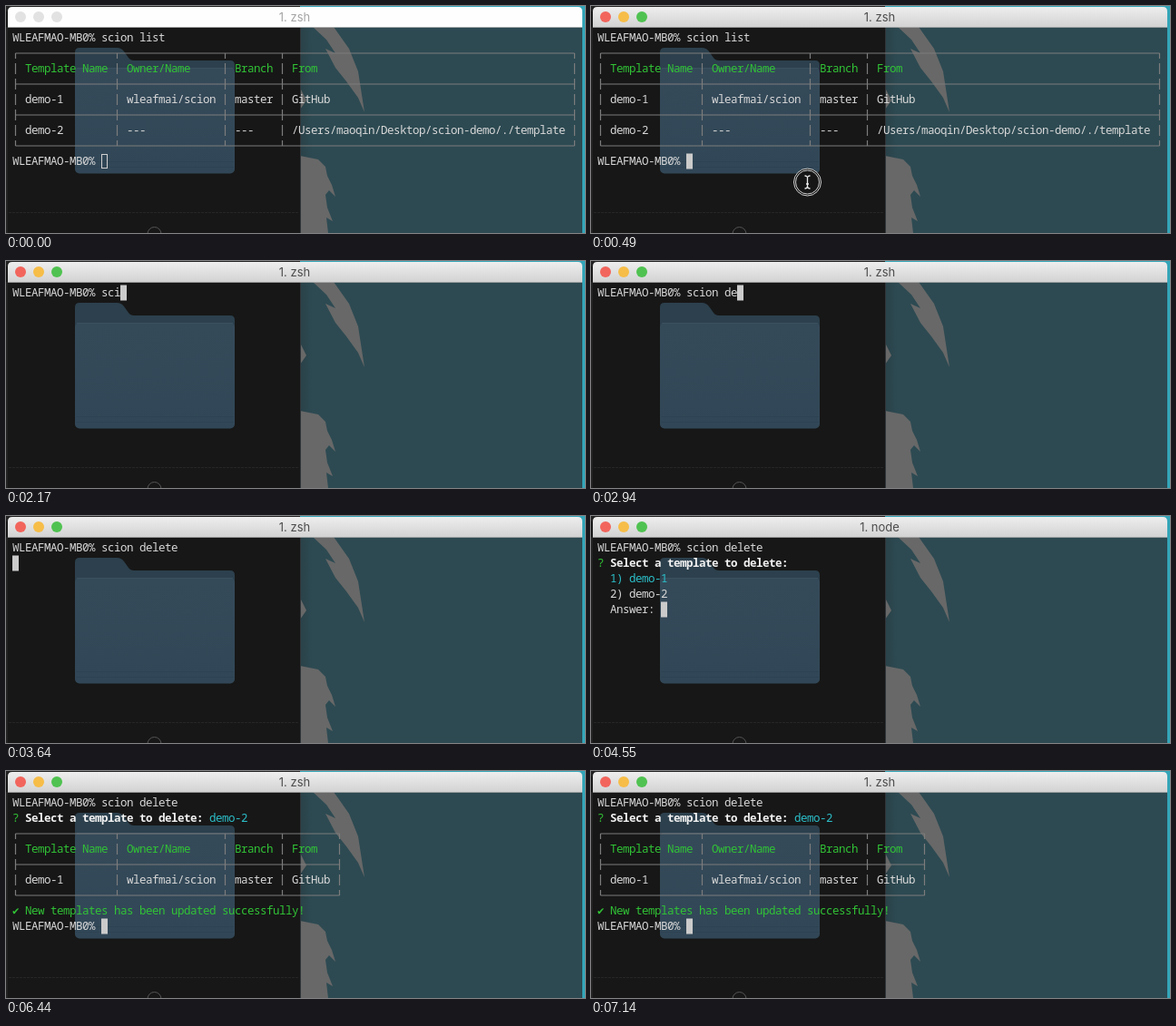
Animation of 638x250 px, one loop 7490 ms. Source, as an HTML page:

```html
<!DOCTYPE html>
<html lang="en">
<head>
<meta charset="utf-8">
<title>Terminal: deleting a template</title>
<style>
  html, body { margin: 0; width: 100%; height: 100%; overflow: hidden; background: #171717; }
  svg { display: block; width: 638px; height: 250px; }
  .mono { font: 12.5px "Noto Sans Mono", "DejaVu Sans Mono", monospace; letter-spacing: -.5px; fill: #d8d8d8; }
  .title { font: 13px Inter, Roboto, "Liberation Sans", sans-serif; text-anchor: middle; }
  .green { fill: #31c336; }
  .cyan { fill: #2cbfc9; }
  .bold { font-weight: 700; fill: #f2f2f2; }
  .rule { stroke: #7c7c7c; stroke-width: 1.2; fill: none; }
</style>
</head>
<body>
<svg viewBox="0 0 638 250" xmlns="http://www.w3.org/2000/svg">
  <defs>
    <linearGradient id="bar" x2="0" y2="1">
      <stop offset="0" stop-color="#eeeeee"/><stop offset="1" stop-color="#d2d2d2"/>
    </linearGradient>
    <linearGradient id="front" x2="0" y2="1">
      <stop offset="0" stop-color="#354a59"/><stop offset="1" stop-color="#314757"/>
    </linearGradient>
    <linearGradient id="edge">
      <stop offset="0" stop-color="#2a4148"/><stop offset="1" stop-color="#2d4a52"/>
    </linearGradient>
    <path id="beam" d="M-3 -7Q0 -7 0 -4.500V4.500Q0 7 -3 7M3 -7Q0 -7 0 -4.500V4.500Q0 7 3 7M-1.500 2H1.500"/>
  </defs>

  <!-- desktop seen through the window -->
  <rect width="638" height="250" fill="#171717"/>
  <rect x="324" width="314" height="250" fill="#2d4a52"/>
  <rect x="324" width="14" height="250" fill="url(#edge)"/>
  <g fill="#686868">
    <path d="M338 23H361L378 47L388 72L395 117L388 101L375 83L363 68L352 47L363 52L353 37Z"/>
    <path d="M324 90L331 104L324 114Z"/>
    <path d="M324 165L344 169L352 177L354 187L359 197L363 210L356 203L352 208L354 222L360 237L353 233L355 250H324Z"/>
  </g>
  <path d="M324.500 23V250" stroke="#30363a"/>
  <path d="M3 227.500H323" stroke="#262626" stroke-dasharray="3 1"/>
  <circle cx="163.500" cy="251" r="7.500" fill="none" stroke="#555"/>
  <path d="M76 180V51Q76 46 81 46H122Q127 46 130 50L135 57Q137 60 141 60H247Q252 60 252 65V180Z" fill="#2c404d"/>
  <rect x="76" y="68" width="176" height="116.500" rx="5" fill="url(#front)"/>
  <path d="M78 68.500H250" stroke="#3a5060"/>
  <path d="M77 171.500H251M77 177.500H251" stroke="#2d4252"/>
  <path d="M1 23V250" stroke="#222" stroke-width="2"/>
  <path d="M636.500 0V250" stroke="#34a5b8" stroke-width="3"/>

  <!-- title bar -->
  <rect width="324" height="6" fill="#222"/>
  <rect x="324" width="314" height="6" fill="#34a5b8"/>
  <path id="head" d="M2 23.500V6Q2 1 7 1H630Q635 1 635 6V23.500Z"/>
  <path d="M2 23.500H635" stroke="#a9a9a9" stroke-width=".6"/>
  <g id="lights">
    <circle cx="16" cy="12" r="6"/><circle cx="36" cy="12" r="6"/><circle cx="56" cy="12" r="6"/>
  </g>
  <text id="title" class="title" x="318" y="17"></text>

  <g id="screen" class="mono"></g>
  <rect id="caret"/>
  <text id="under" class="mono"></text>

  <g id="mouse" fill="none">
    <g id="ring">
      <circle r="15" fill="#161616" stroke="#cfcfcf"/>
      <circle r="13" stroke="#cfcfcf"/>
    </g>
    <use href="#beam" stroke="#161616" stroke-width="3"/>
    <use href="#beam" stroke="#ececec" stroke-width="1.300"/>
  </g>
</svg>

<script>
const LOOP = 7490, STEP = 70, CELL = 7, LINE = 17;
const FOCUS = 420, CLEAR = 1120, HIDE = 1610, ENTER = 3640;
const ASK = 4480, PICK = 5530, CONFIRM = 5670, DONE = 5740;
const PROMPT = "WLEAFMAO-MB0%";
const COMMAND = "scion delete";
const KEYS = [1610, 1890, 2170, 2240, 2380, 2520, 2660, 2940, 3080, 3220, 3360, 3430];

const $ = id => document.getElementById(id);
const colX = col => 7 + col * CELL;
const rowY = row => 35 + row * LINE;
const timed = [];

function add(tag, attrs, parent = $("screen")) {
  const el = document.createElementNS("http://www.w3.org/2000/svg", tag);
  for (const key in attrs) el.setAttribute(key, attrs[key]);
  return parent.appendChild(el);
}

function scene(from, to) {
  const el = add("g", {});
  timed.push({ el, from, to });
  return el;
}

function write(parent, row, col, text, style = "") {
  const el = add("text", { x: colX(col), y: rowY(row) + 4, class: style }, parent);
  el.textContent = text;
  return el;
}

// Box-drawing table: one rule above each record and one below the last.
function table(parent, top, bars, records) {
  const xs = bars.map(col => colX(col) + 3.5);
  const last = records.length * 2;
  let d = "";
  for (let i = 0; i <= last; i++) {
    const y = rowY(top + i);
    if (i % 2 === 0) d += `M${xs[0]} ${y}H${xs[xs.length - 1]}`;
    const y1 = i === 0 ? y : y - 6, y2 = i === last ? y : y + 6;
    for (const x of xs) d += `M${x} ${y1}V${y2}`;
  }
  add("path", { d, class: "rule" }, parent);
  records.forEach((cells, r) => cells.forEach((text, c) =>
    write(parent, top + 1 + r * 2, bars[c] + 2, text, r ? "" : "green")));
}

const header = ["Template Name", "Owner/Name", "Branch", "From"];
const first = ["demo-1", "wleafmai/scion", "master", "GitHub"];
const second = ["demo-2", "---", "---", "/Users/maoqin/Desktop/scion-demo/./template"];

write($("screen"), 0, 0, PROMPT);
const typed = write($("screen"), 0, 14, "");

const list = scene(0, CLEAR);
table(list, 1, [0, 16, 33, 42, 88], [header, first, second]);
write(list, 8, 0, PROMPT);

const question = scene(ASK, LOOP);
write(question, 1, 0, "?", "green");
write(question, 1, 2, "Select a template to delete:", "bold");

const choices = scene(ASK, CONFIRM);
const one = write(choices, 2, 2, "1) demo-1");
const two = write(choices, 3, 2, "2) demo-2");
write(choices, 4, 2, "Answer:");

write(scene(CONFIRM, LOOP), 1, 31, "demo-2", "cyan");

const result = scene(DONE, LOOP);
table(result, 2, [0, 16, 33, 42, 51], [header, first]);
write(result, 7, 0, "✔", "green");
write(result, 7, 2, "New templates has been updated successfully!", "green");
write(result, 8, 0, PROMPT);

const show = (el, on) => el.setAttribute("visibility", on ? "visible" : "hidden");
const clamp = v => Math.max(0, Math.min(1, v));
const set = (el, attrs) => { for (const k in attrs) el.setAttribute(k, attrs[k]); };

function caretCell(t, count) {
  if (t < CLEAR) return [14, 8];
  if (t < ENTER) return [14 + count, 0];
  if (t < ASK) return [0, 1];
  if (t < CONFIRM) return [10, 4];
  if (t < DONE) return [0, 2];
  return [14, 8];
}

function drawWindow(t) {
  const active = t >= FOCUS;
  set($("head"), { fill: active ? "url(#bar)" : "#fefefe" });
  const colors = active ? ["#f2655c", "#f6bd48", "#50c251"] : Array(3).fill("#e2e2e2");
  [...$("lights").children].forEach((dot, i) => set(dot, { fill: colors[i] }));
  $("title").textContent = t >= ASK && t < DONE ? "1. node" : "1. zsh";
  set($("title"), { fill: active ? "#4c4c4c" : "#a4a4a4" });
}

function drawCaret(t, count) {
  const [col, row] = caretCell(t, count);
  const x = colX(col), y = rowY(row) - 8.5;
  set($("caret"), t < FOCUS
    ? { x: x + .5, y: y + 1, width: 6, height: 15, fill: "none", stroke: "#d0d0d0" }
    : { x, y, width: 7, height: 17, fill: "#cbcbcb", stroke: "none" });
  set($("under"), { x, y: rowY(row) + 4, style: "fill:#f4f4f4" });
  $("under").textContent = t >= PICK && t < CONFIRM ? "2" : "";
}

function drawMouse(t) {
  const p = clamp(t / 350), ease = p * p * (3 - 2 * p);
  set($("mouse"), { transform: `translate(${238.5 + 14 * (1 - ease)} ${194 + 76 * (1 - ease)})` });
  show($("mouse"), t < HIDE);
  set($("ring"), { opacity: t < FOCUS ? 0 : clamp((700 - t) / 210) });
}

function draw(now) {
  const t = Math.floor((now % LOOP) / STEP) * STEP;
  const count = KEYS.filter(k => k <= t).length;
  typed.textContent = t < CLEAR ? "scion list" : COMMAND.slice(0, count);
  for (const { el, from, to } of timed) show(el, t >= from && t < to);
  set(one, { class: t < PICK ? "cyan" : "" });
  set(two, { class: t < PICK ? "" : "cyan" });
  drawWindow(t);
  drawCaret(t, count);
  drawMouse(t);
}

const start = performance.now();
function tick() {
  draw(performance.now() - start);
  requestAnimationFrame(tick);
}
tick();
</script>
</body>
</html>
```
